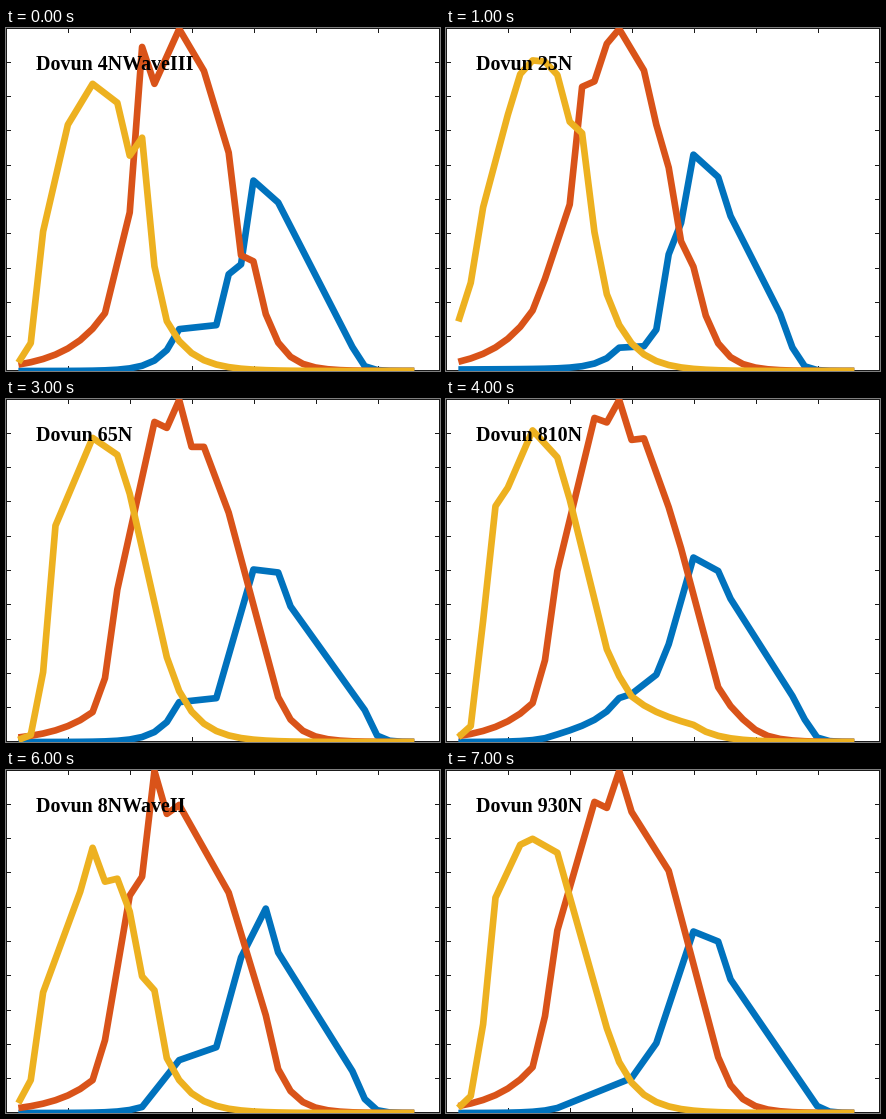
These frames come from a looping animation (434x343 px, 8000 ms). A matplotlib script:

```python
import matplotlib.pyplot as plt
import numpy as np
from matplotlib.animation import FuncAnimation
from matplotlib.patches import Rectangle

W, H = 434, 343
DPI = 100
PX = 72 / DPI
SAMPLES = np.arange(1, 34)
STEP = (W - 1) / 35
TICK = 4
INK = "#1a1a1a"

# Per channel: colour, growth per sample before the first bend,
# decay per sample after the last one
CHANNELS = [
    ("#0072BD", 0.5, 0.2),
    ("#D95319", 0.73, 0.5),
    ("#EDB120", 0.3, 0.6),
]


def response(bends, rise, fall):
    """Straight runs between the bends, exponential skirts outside them."""
    xs, ys = np.transpose(bends)
    before = np.maximum(xs[0] - SAMPLES, 0)
    after = np.maximum(SAMPLES - xs[-1], 0)
    heights = np.interp(SAMPLES, xs, ys) * rise**before * fall**after
    return heights * (H - 1) / H


def camera(*channels):
    return np.array([response(bends, rise, fall)
                     for bends, (_, rise, fall) in zip(channels, CHANNELS)])


def blend(a, b):
    """Camera halfway between two others, scaled to a full-height peak."""
    mean = (a + b) / 2
    return mean * (H - 1) / mean.max()


# Bends are (sample, height) pairs
wave3 = camera(
    [(14, 42), (17, 46), (18, 97), (19, 107), (20, 191), (22, 169), (28, 24)],
    [(8, 58), (10, 159), (11, 325), (12, 288), (14, 343), (16, 301),
     (18, 219), (19, 116), (20, 110), (21, 57)],
    [(2, 28), (3, 140), (5, 247), (7, 288), (9, 269), (10, 216), (11, 234),
     (12, 105), (13, 50)],
)
n720 = camera(
    [(1, 3), (16, 5), (17, 37), (18, 137), (20, 243), (22, 220), (23, 166),
     (27, 67), (28, 23)],
    [(7, 79), (8, 127), (10, 175), (11, 245), (13, 341), (14, 343),
     (16, 302), (17, 234), (21, 54)],
    [(1, 91), (2, 149), (5, 267), (6, 328), (8, 342), (9, 325), (11, 243),
     (13, 104)],
)
n65 = camera(
    [(14, 40), (17, 44), (20, 173), (22, 170), (23, 136), (29, 32)],
    [(7, 30), (8, 64), (9, 153), (12, 321), (13, 315), (14, 343), (15, 296),
     (16, 296), (18, 230), (22, 45)],
    [(2, 7), (3, 70), (4, 217), (7, 305), (9, 288), (10, 249), (13, 85)],
)
n85 = camera(
    [(9, 14), (15, 55), (18, 109), (20, 197), (22, 173), (28, 43), (29, 13)],
    [(7, 48), (8, 100), (9, 190), (12, 329), (13, 326), (14, 343), (15, 310),
     (16, 313), (19, 205), (22, 65), (25, 19)],
    [(2, 25), (3, 173), (4, 256), (5, 264), (7, 320), (9, 283), (13, 101),
     (15, 61), (20, 32)],
)
wave2 = camera(
    [(11, 6), (14, 53), (17, 66), (19, 156), (21, 205), (22, 161), (28, 42),
     (29, 14)],
    [(7, 33), (8, 73), (10, 218), (11, 237), (12, 343), (13, 300), (14, 309),
     (18, 221), (21, 98), (22, 44)],
    [(2, 33), (3, 121), (6, 222), (7, 266), (8, 232), (9, 235), (10, 202),
     (11, 137), (12, 123), (13, 55)],
)
n930 = camera(
    [(9, 5), (15, 35), (17, 70), (20, 182), (22, 172), (23, 134), (30, 7)],
    [(7, 46), (8, 97), (9, 183), (12, 312), (13, 306), (14, 343), (15, 302),
     (18, 243), (22, 56)],
    [(2, 17), (3, 89), (4, 216), (6, 269), (7, 275), (9, 261), (13, 85)],
)

CAMERAS = [
    ("4NWaveIII", wave3),
    ("25N", blend(wave3, n720)),
    ("720N", n720),
    ("65N", n65),
    ("810N", blend(n65, n85)),
    ("85N", n85),
    ("8NWaveII", wave2),
    ("930N", n930),
]

fig = plt.figure(figsize=(W / DPI, H / DPI), dpi=DPI, facecolor="white")
ax = fig.add_axes([0, 0, 1, 1])
ax.set(xlim=(0, W), ylim=(0, H))
ax.axis("off")


def bar(x, y, w, h):
    ax.add_patch(Rectangle((x, y), w, h, fc=INK, lw=0, antialiased=False,
                           zorder=1))


# Box with inward ticks on all four sides
for y in (0, H - 1):
    bar(0, y, W, 1)
for x in (0, W - 1):
    bar(x, 0, 1, H)
for k in range(1, 7):
    for y in (1, H - 1 - TICK):
        bar(k * W // 7, y, 1, TICK)
for k in range(1, 10):
    for x in (1, W - 1 - TICK):
        bar(x, H - 1 - k * H // 10, TICK, 1)

lines = [
    ax.plot([], [], color=color, lw=6.67 * PX, solid_capstyle="butt",
            solid_joinstyle="round", zorder=2)[0]
    for color, _, _ in CHANNELS
]
label = ax.text(30, H - 42, "", family="Liberation Serif", weight="bold",
                size=20 * PX, color="black", va="baseline", zorder=3)


def draw(i):
    model, curves = CAMERAS[i]
    for line, heights in zip(lines, curves):
        line.set_data(SAMPLES * STEP, heights)
    label.set_text("Dovun " + model)
    return [*lines, label]


anim = FuncAnimation(fig, draw, frames=len(CAMERAS), interval=1000,
                     repeat=True, repeat_delay=0)
plt.show()
```
